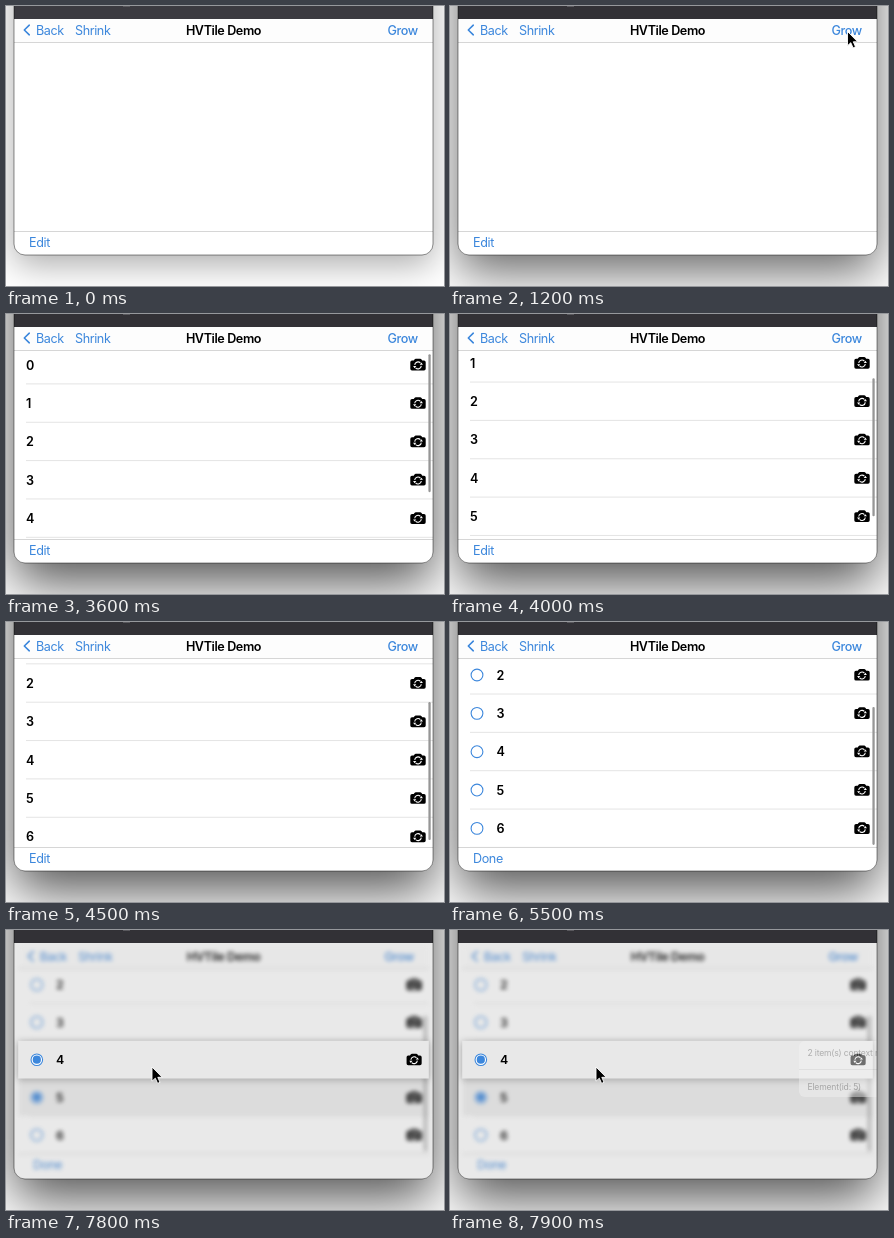
Animation of 438 by 280 pixels, one loop 8000 ms. Source, as an HTML page:

```html
<!DOCTYPE html>
<html lang="en">
<head>
<meta charset="utf-8">
<title>List demo</title>
<style>
  html, body { margin: 0; width: 438px; height: 280px; overflow: hidden; background: #fff; }
  #shadow { position: absolute; left: 8px; top: -80px; width: 419px; height: 329px; border-radius: 11px; }
  svg { position: absolute; left: 0; top: 0; }
  text { font: 12.6px Inter, Roboto, sans-serif; letter-spacing: -.4px; }
  .blue { fill: #3c87dc; }
  .bold { font-weight: 600; fill: #000; }
  #grow { font-weight: 500; }
  .small text { font-size: 8.6px; letter-spacing: -.2px; fill: #666; }
  .line { stroke: #e4e4e4; stroke-width: 1; }
  .edge { stroke: #d6d6d6; stroke-width: 1; }
  .ring { fill: #fff; stroke: #3c87dc; stroke-width: 1.1; }
</style>
</head>
<body>
<div id="shadow"></div>
<svg width="438" height="280" viewBox="0 0 438 280">
  <defs>
    <clipPath id="win"><rect x="8" y="-20" width="419" height="269" rx="11"/></clipPath>
    <clipPath id="view"><rect x="8" y="37" width="419" height="188"/></clipPath>
    <g id="camera">
      <path d="M-6-4.2h1.7l1-1.3q.4-.5 1-.5h4.6q.6 0 1 .5l1 1.3H6q1.7 0 1.7 1.7v6.5Q7.7 5.7 6 5.7H-6Q-7.7 5.7-7.7 4v-6.5q0-1.7 1.7-1.7z"/>
      <g fill="none" stroke="#fff" stroke-width="1.1">
        <path d="M-3.3.1A3.3 3.3 0 0 1 2.4-1.8"/>
        <path d="M3.3 1.1A3.3 3.3 0 0 1-2.4 3"/>
      </g>
      <path fill="#fff" d="M1.7 0h3.2L3.4-2.2zM-1.7 1.2h-3.2L-3.4 3.4z"/>
    </g>
  </defs>
  <g clip-path="url(#win)">
    <rect x="8" y="0" width="419" height="250" fill="#fff"/>
    <g id="app">
      <g clip-path="url(#view)">
        <g id="rows"></g>
        <rect id="bar" x="422.4" width="2.3" height="138" rx="1.1" fill="#969696"/>
      </g>
      <rect x="8" y="13" width="419" height="23.5" fill="#fdfdfd"/>
      <path class="edge" d="M8 36.5H427M8 225.5H427"/>
      <path d="M23.3 19.2L18.3 24l5 4.8" fill="none" stroke="#3c87dc" stroke-width="1.6" stroke-linecap="round" stroke-linejoin="round"/>
      <text class="blue" x="30" y="28.5">Back</text>
      <text class="blue" x="69" y="28.5">Shrink</text>
      <text class="bold" x="217.5" y="28.5" text-anchor="middle">HVTile Demo</text>
      <text class="blue" id="grow" x="381.5" y="28.5">Grow</text>
      <text class="blue" id="edit" x="23" y="241">Edit</text>
      <text class="blue" id="done" x="23" y="241">Done</text>
    </g>
    <rect id="dim" x="8" y="13" width="419" height="240"/>
    <g id="lift"></g>
    <g id="menu" class="small">
      <rect x="349" y="111" width="110" height="56" rx="6" fill="#f4f4f4"/>
      <path class="edge" d="M349 139.5H459"/>
      <text x="357.5" y="125.5">2 item(s) context menu</text>
      <text x="357.5" y="159.5">Element(id: 5)</text>
    </g>
    <rect id="top" x="8" y="0" width="419" height="13"/>
    <rect x="117" y="0" width="7" height="1" fill="#59585d"/>
  </g>
  <rect x="8" y="-20" width="419" height="269" rx="11" fill="none" stroke="#000" stroke-opacity=".5" stroke-width=".9"/>
  <path id="cursor" d="M0 0V14.2L3.3 11.2 5.6 16.4 8 15.3 5.8 10.3H10.2Z" stroke="#fff" stroke-width=".9"/>
</svg>
<script>
const LOOP = 8000, STEP = 100, PITCH = 38.35, FIRST = 55.9;
const added = [1200, 1700, 1900, 2100, 2300, 2500, 2700];
const picked = { 4: 5900, 5: 6100 };
const presses = [1100, 1800, 2000, 2400, 2600, 2700];
const scrollKeys = [[3500, 0], [3600, 5], [3800, 25], [4000, 45.2], [4200, 58.5], [4500, 71.4], [4700, 77], [4900, 79.6]];
const cursorKeys = [[1000, 397.5, 25.5], [3000, 407, 121], [3100], [7300, 146, 137]];

const $ = id => document.getElementById(id);
const ramp = (t, a, b) => Math.min(1, Math.max(0, (t - a) / (b - a)));
const ease = p => p * p * (3 - 2 * p);
const move = (el, x, y) => el.setAttribute('transform', `translate(${x} ${y})`);
const fade = (el, a) => el.setAttribute('opacity', a);
const zoom = (el, s, x, y) =>
  el.setAttribute('transform', `translate(${x} ${y}) scale(${s}) translate(${-x} ${-y})`);

function track(keys, t) {
  let value = keys[0][1];
  for (let i = 1; i < keys.length; i++) {
    const [a, from] = keys[i - 1], [b, to] = keys[i];
    if (t > a) value = from + (to - from) * ramp(t, a, b);
  }
  return value;
}

function makeRow(parent, i) {
  const el = document.createElementNS('http://www.w3.org/2000/svg', 'g');
  el.innerHTML = `
    <rect class="back" x="8" y="-19.2" width="419" height="38.4" fill="#efefef"/>
    <path class="line" d="M20 19H427"/>
    <g class="check"><circle class="ring" cx="27" r="5.9"/><circle class="dot blue" cx="27" r="4.2"/></g>
    <text class="num bold" y="4.6">${i}</text>
    <use href="#camera" x="412" y="-.1"/>`;
  parent.append(el);
  const part = name => el.querySelector('.' + name);
  return { i, el, back: part('back'), line: part('line'), check: part('check'), dot: part('dot'), num: part('num') };
}

const rows = added.map((_, i) => makeRow($('rows'), i));
const card = makeRow($('lift'), 4);
card.line.remove();
$('lift').style.filter = 'drop-shadow(0 1px 4px rgba(0,0,0,.3))';

function drawRow(row, t, scroll) {
  const editing = ease(ramp(t, 4800, 5300));
  const on = t >= (picked[row.i] ?? LOOP) ? 1 : 0;
  move(row.el, 0, FIRST + PITCH * row.i - scroll);
  fade(row.el, ramp(t, added[row.i], added[row.i] + 300));
  fade(row.back, on);
  fade(row.dot, on);
  fade(row.check, editing);
  move(row.check, -12 * (1 - editing), 0);
  row.num.setAttribute('x', 20 + 26.5 * editing);
}

function drawShadow(t) {
  const p = ramp(t, 900, 1300);
  const mix = (a, b) => a + (b - a) * p;
  $('shadow').style.boxShadow = `0 ${mix(10, 20)}px ${mix(34, 52)}px rgba(0,0,0,${mix(.33, .68)})`;
  $('top').setAttribute('fill', p < .5 ? '#3b3a40' : '#323136');
}

function drawCursor(t) {
  const key = cursorKeys.filter(k => k[0] <= t).pop();
  const shown = key && key.length > 1;
  fade($('cursor'), shown ? 1 : 0);
  if (shown) move($('cursor'), key[1], key[2]);
}

function draw(t) {
  const scroll = track(scrollKeys, t);
  drawShadow(t);
  for (const row of rows) drawRow(row, t, scroll);
  drawRow(card, t, scroll);

  $('bar').setAttribute('y', 37.2 + .6 * scroll);
  fade($('bar'), t >= 3600 ? 1 : 0);
  fade($('grow'), presses.includes(t) ? .5 : 1);
  const swap = ramp(t, 5200, 5500);
  fade($('edit'), 1 - swap);
  fade($('done'), swap);

  // Long press: the app recedes and blurs while one row lifts out.
  const p = ease(ramp(t, 7300, 7800)), scale = 1 - .02 * p;
  zoom($('app'), scale, 218, 139);
  $('app').style.filter = p ? `blur(${2.4 * p}px)` : 'none';
  fade($('app'), 1 - .15 * p);
  fade($('dim'), .085 * p);
  zoom($('lift'), scale, 218, FIRST + PITCH * 4 - scroll);
  $('lift').style.display = p ? '' : 'none';
  if (p) fade(rows[4].el, 0);
  card.back.setAttribute('fill', p > .5 ? '#e8e8e8' : '#efefef');
  fade($('menu'), .45 * ramp(t, 7800, 7900));
  drawCursor(t);
}

const start = performance.now();
function tick() {
  const t = (performance.now() - start) % LOOP;
  draw(Math.floor(t / STEP) * STEP);
  requestAnimationFrame(tick);
}
tick();
</script>
</body>
</html>
```
